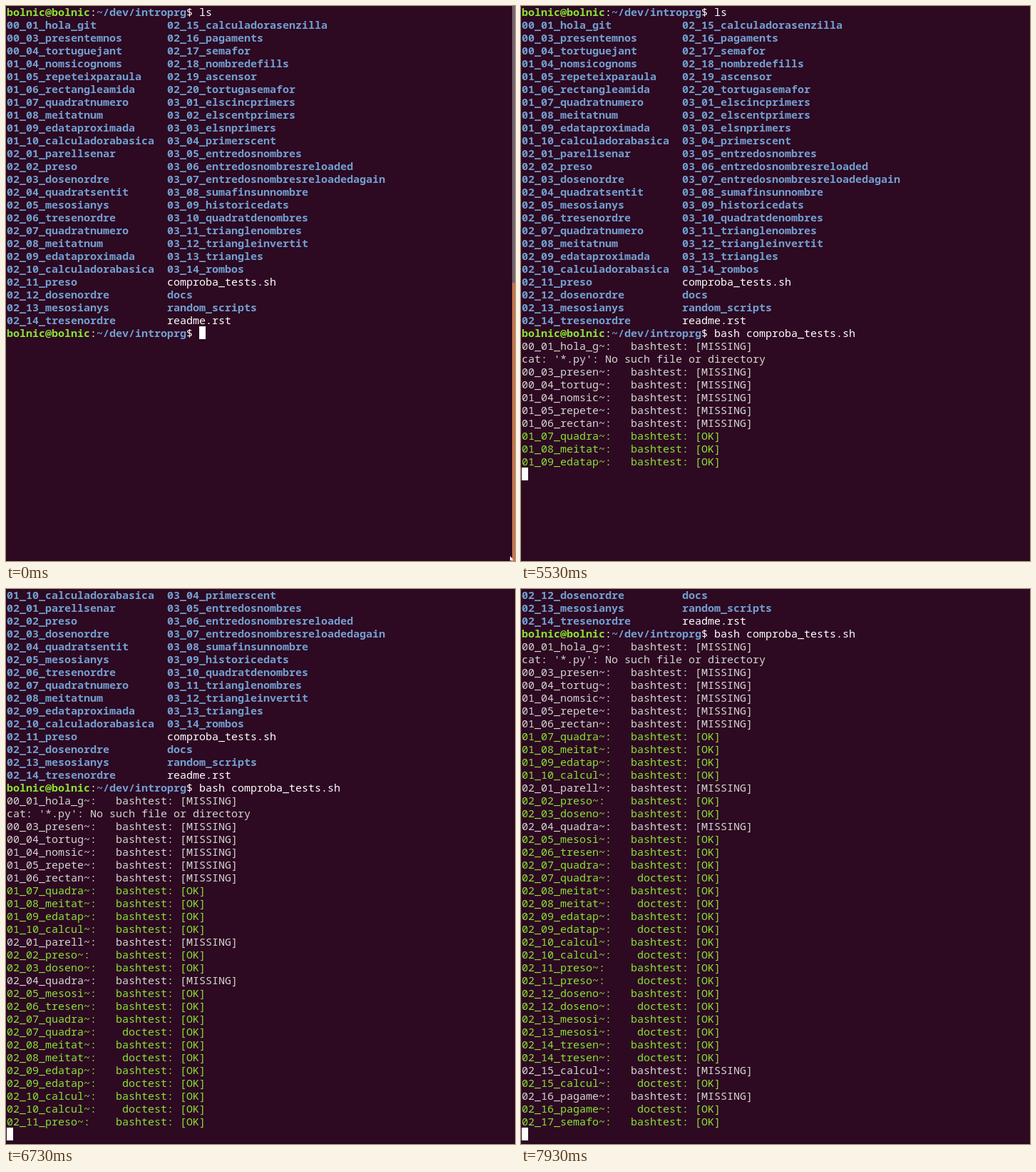
These frames come from a looping animation (714x778 px, 8000 ms). An HTML page with a canvas:

```html
<!DOCTYPE html>
<html lang="ca">
<head>
<meta charset="utf-8">
<title>Terminal</title>
<style>
  html, body { margin: 0; width: 100%; height: 100%; overflow: hidden; background: #2d0922; }
  canvas { display: block; }
</style>
</head>
<body>
<canvas id="stage" width="714" height="778"></canvas>
<script>
const ctx = document.getElementById('stage').getContext('2d');
const WIDTH = 714, HEIGHT = 778, LOOP = 8000;
const CELL = 9, LINE = 18, ROWS = 43;
const BG = '#2d0922', BLUE = '#729fcf', GREEN = '#8ae234', WHITE = '#ffffff', GREY = '#d3d7cf';
const FONT = '15px "Noto Sans Mono", "DejaVu Sans Mono", monospace';

const entries = `00_01_hola_git 00_03_presentemnos 00_04_tortuguejant 01_04_nomsicognoms
01_05_repeteixparaula 01_06_rectangleamida 01_07_quadratnumero 01_08_meitatnum
01_09_edataproximada 01_10_calculadorabasica 02_01_parellsenar 02_02_preso
02_03_dosenordre 02_04_quadratsentit 02_05_mesosianys 02_06_tresenordre
02_07_quadratnumero 02_08_meitatnum 02_09_edataproximada 02_10_calculadorabasica
02_11_preso 02_12_dosenordre 02_13_mesosianys 02_14_tresenordre
02_15_calculadorasenzilla 02_16_pagaments 02_17_semafor 02_18_nombredefills
02_19_ascensor 02_20_tortugasemafor 03_01_elscincprimers 03_02_elscentprimers
03_03_elsnprimers 03_04_primerscent 03_05_entredosnombres 03_06_entredosnombresreloaded
03_07_entredosnombresreloadedagain 03_08_sumafinsunnombre 03_09_historicedats
03_10_quadratdenombres 03_11_trianglenombres 03_12_triangleinvertit 03_13_triangles
03_14_rombos comproba_tests.sh docs random_scripts readme.rst`.split(/\s+/);

const COMMAND = 'bash comproba_tests.sh ';
const PROMPT_LENGTH = 30;

// A line is a list of runs: [column, text, colour, bold]
const promptLine = command => [
  [0, 'bolnic@bolnic', GREEN, true],
  [13, ':', WHITE, false],
  [14, '~/dev/introprg', BLUE, true],
  [28, '$ ' + command, WHITE, false]
];

function listingRun(name, column) {
  const isFile = name.includes('.');
  return [column, name, isFile ? WHITE : BLUE, !isFile];
}

function testLine(name, test, ok) {
  const label = (name.slice(0, 12) + '~:').padEnd(17);
  const text = `${label}${test.padStart(8)}: [${ok ? 'OK' : 'MISSING'}]`;
  return [[0, text, ok ? GREEN : GREY, false]];
}

const header = [promptLine('ls')];
for (let i = 0; i < 24; i++) {
  header.push([listingRun(entries[i], 0), listingRun(entries[i + 24], 25)]);
}

const missing = new Set([0, 1, 2, 3, 4, 5, 10, 13, 24, 25]);
const output = [];
entries.slice(0, 27).forEach((name, i) => {
  output.push(testLine(name, 'bashtest', !missing.has(i)));
  if (i === 0) output.push([[0, "cat: '*.py': No such file or directory", GREY, false]]);
  if (i >= 16) output.push(testLine(name, 'doctest', true));
});

// Step timelines: [time, value]
const typed = [[0, 0], [1930, 1], [2070, 2], [2130, 3], [2270, 4], [2870, 5], [3130, 6],
  [3200, 8], [3470, 9], [3600, 10], [3730, 11], [3930, COMMAND.length]];
const printed = [[0, 0], [5400, 3], [5470, 6], [5530, 10], [5600, 11], [5730, 13], [5800, 15],
  [6130, 17], [6200, 18], [6270, 19], [6330, 20], [6400, 21], [6470, 22], [6530, 23],
  [6600, 24], [6670, 25], [6730, 26], [6870, 27], [7000, 28], [7070, 29], [7200, 30],
  [7330, 31], [7530, 32], [7600, 34], [7670, 35], [7730, 36], [7930, 38]];
const blink = [[0, true], [2800, false], [2870, true], [4530, false], [5130, true],
  [5930, false], [6530, true], [7130, false], [7730, true]];
const pointer = [[0, [707, 771]], [70, [640, 715]], [130, [555, 638]], [200, [493, 584]],
  [270, [468, 565]], [470, [467, 558]], [530, [466, 552]], [1930, null]];
const barOpacity = [[0, 1], [70, 0.75], [130, 0.5], [200, 0.25], [270, 0]];
const ENTER = 5330;

function valueAt(steps, time) {
  let value = steps[0][1];
  for (const [start, next] of steps) {
    if (time >= start) value = next;
  }
  return value;
}

function rect(x, y, w, h, colour) {
  ctx.fillStyle = colour;
  ctx.fillRect(x, y, w, h);
}

function drawLine(runs, row) {
  for (const [column, text, colour, bold] of runs) {
    ctx.font = (bold ? 'bold ' : '') + FONT;
    ctx.fillStyle = colour;
    [...text].forEach((char, i) => {
      if (char !== ' ') ctx.fillText(char, 1 + (column + i) * CELL, row * LINE + 14);
    });
  }
}

function drawScrollbar(opacity) {
  ctx.globalAlpha = opacity;
  rect(710, 0, 4, 388, '#77636f');
  rect(710, 388, 4, 390, '#c8754a');
  ctx.globalAlpha = 1;
}

function drawPointer([x, y]) {
  ctx.beginPath();
  ctx.moveTo(x, y);
  ctx.lineTo(x, y + 7);
  ctx.lineTo(x + 1.6, y + 5.6);
  ctx.lineTo(x + 2.8, y + 8);
  ctx.lineTo(x + 3.8, y + 7.5);
  ctx.lineTo(x + 2.8, y + 5);
  ctx.lineTo(x + 4.6, y + 5);
  ctx.closePath();
  ctx.fillStyle = WHITE;
  ctx.fill();
}

function draw(time) {
  const command = COMMAND.slice(0, valueAt(typed, time));
  const lines = [...header, promptLine(command), ...output.slice(0, valueAt(printed, time))];
  const running = time >= ENTER;
  const cursorLine = running ? lines.length : lines.length - 1;
  const cursorColumn = running ? 0 : PROMPT_LENGTH + command.length;
  const scroll = Math.max(0, cursorLine - ROWS + 1);

  rect(0, 0, WIDTH, HEIGHT, BG);
  rect(0, HEIGHT - 1, WIDTH, 1, '#220719');
  lines.slice(scroll).forEach(drawLine);
  if (valueAt(blink, time)) {
    rect(1 + cursorColumn * CELL, (cursorLine - scroll) * LINE - 1, CELL, LINE, WHITE);
  }

  const opacity = valueAt(barOpacity, time);
  if (opacity) drawScrollbar(opacity);
  const position = valueAt(pointer, time);
  if (position) drawPointer(position);
}

const start = performance.now();
function tick() {
  draw((performance.now() - start) % LOOP);
  requestAnimationFrame(tick);
}
tick();
</script>
</body>
</html>
```
